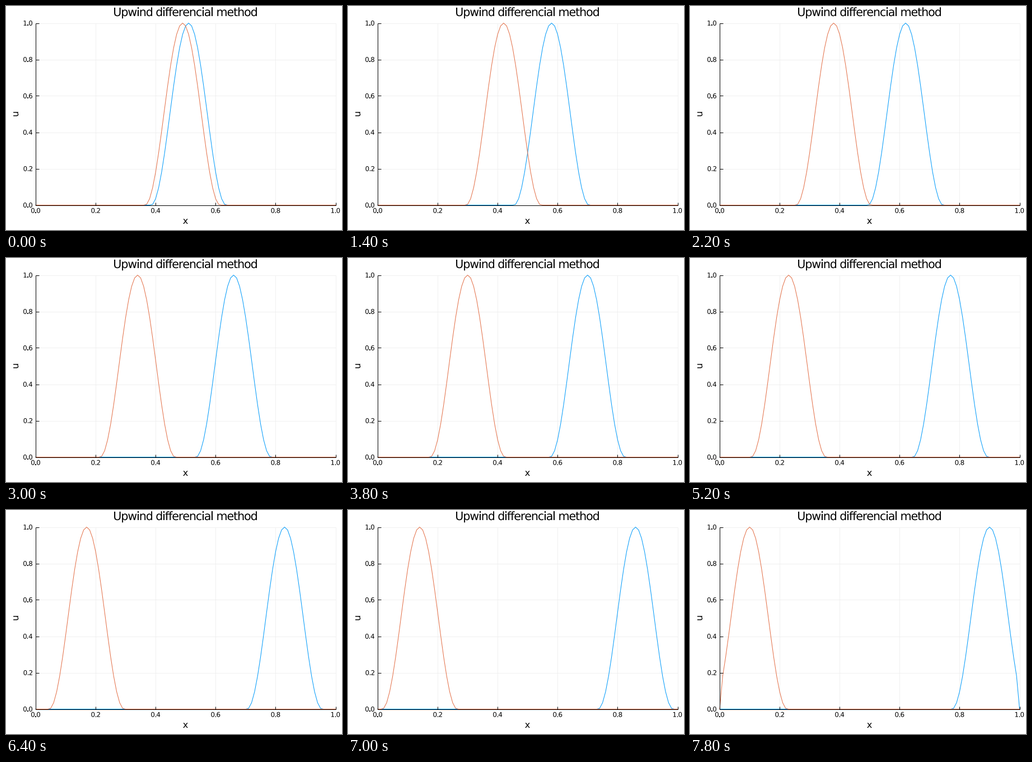
Recreate the animation shown at these times as a matplotlib script. Size 600 by 400 pixels, loop 8 s.

```python
import numpy as np
import matplotlib.pyplot as plt
from matplotlib.animation import FuncAnimation
from matplotlib.patches import PathPatch
from matplotlib.textpath import TextPath
from matplotlib.transforms import Affine2D

W, H, DPI = 600, 400, 100
LEFT, RIGHT, TOP, BOTTOM = 53, 588.5, 30.5, 355.5
PX = 72 / DPI
TRACKING = -0.054  # letter spacing in em
FONT = {"family": "DejaVu Sans"}
BLUE, ORANGE = "#009afa", "#e36f47"

fig = plt.figure(figsize=(W / DPI, H / DPI), dpi=DPI, facecolor="white")
ax = fig.add_axes([0, 0, 1, 1])
ax.set_xlim(0, W)
ax.set_ylim(H, 0)
ax.axis("off")


def to_x(v):
    return LEFT + (RIGHT - LEFT) * v


def to_y(v):
    return BOTTOM + (TOP - BOTTOM) * v


def segment(x0, y0, x1, y1, color="black", width=1.0, z=3):
    ax.plot([x0, x1], [y0, y1], color=color, lw=width * PX, zorder=z,
            solid_capstyle="butt")


def advance(char, size):
    """Pen advance of one glyph, measured between two bars."""
    def width(s):
        return TextPath((0, 0), s, size=100, prop=FONT).get_extents().width
    return (width("|" + char + "|") - width("||")) * size / 100


def label(text, x, y, size, align=0.5, angle=0):
    """Set text glyph by glyph; the ink is aligned on x, the baseline is y."""
    glyphs, pen = [], 0.0
    for char in text:
        if char != " ":
            glyphs.append((pen, TextPath((0, 0), char, size=size, prop=FONT)))
        pen += advance(char, size) + TRACKING * size
    start = glyphs[0][0] + glyphs[0][1].get_extents().x0
    end = glyphs[-1][0] + glyphs[-1][1].get_extents().x1
    shift = -(start + (end - start) * align)
    for dx, path in glyphs:
        move = (Affine2D().translate(dx + shift, 0).scale(1, -1)
                .rotate_deg(angle).translate(x, y))
        ax.add_patch(PathPatch(move.transform_path(path), fc="black", lw=0,
                               zorder=4))


def draw_axes():
    for v in np.linspace(0, 1, 6):
        x, y = to_x(v), to_y(v)
        segment(x, TOP, x, BOTTOM, "#ededed", 0.8, 1)
        segment(LEFT, y, RIGHT, y, "#ededed", 0.8, 1)
        segment(x, BOTTOM, x, BOTTOM - 5)
        segment(LEFT, y, LEFT + 6, y)
        label(f"{v:.1f}", x, 369.5, 11.85)
        label(f"{v:.1f}", 47, y + 4.3, 11.85, align=1)
    segment(LEFT, BOTTOM, RIGHT, BOTTOM)
    segment(LEFT, TOP, LEFT, BOTTOM)
    label("Upwind differencial method", 320.5, 18, 20.7)
    label("x", 320.5, 389, 16.3)
    label("u", 22, 193, 16.3, angle=-90)


GRID = np.linspace(0, 1, 101)


def pulse(center):
    d = GRID - center
    u = np.where(np.abs(d) < 0.125, np.cos(4 * np.pi * d) ** 2, 0)
    u[0] = u[-1] = 0
    return to_y(u)


draw_axes()
right_wave, = ax.plot([], [], color=BLUE, lw=PX, zorder=2)
left_wave, = ax.plot([], [], color=ORANGE, lw=PX, zorder=2)


def update(i):
    shift = 0.01 * (i + 1)
    right_wave.set_data(to_x(GRID), pulse(0.5 + shift))
    left_wave.set_data(to_x(GRID), pulse(0.5 - shift))
    return right_wave, left_wave


anim = FuncAnimation(fig, update, frames=40, interval=200, repeat=True,
                     repeat_delay=0, init_func=lambda: update(0))
plt.show()
```
